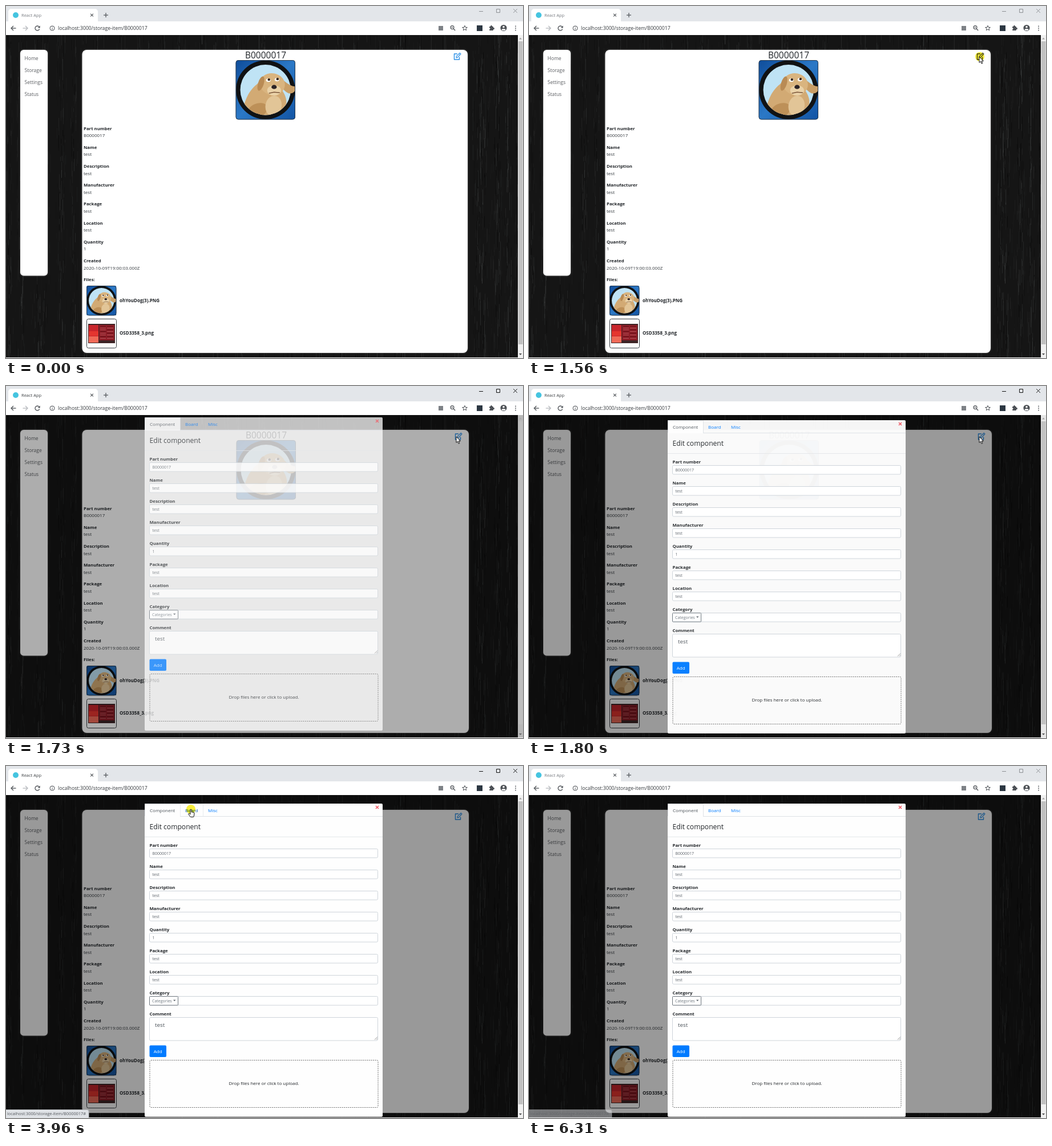
Recreate the animation shown at these times as an HTML page with a canvas. Size 906 px wide and 618 px high, loop 6400 ms.

```html
<!DOCTYPE html>
<html lang="en">
<head>
<meta charset="utf-8">
<title>Edit component</title>
<style>
html, body { margin: 0; width: 100%; height: 100%; overflow: hidden; background: #151515; }
canvas { display: block; }
</style>
</head>
<body>
<canvas id="stage" width="906" height="618"></canvas>
<script>
const W = 906, H = 618, LOOP = 6400, TOP = 51;
const INK = '#212529', LINK = '#007bff', LINE = '#dee2e6';
const FONT = '"Open Sans", "Noto Sans", sans-serif';
let c = document.getElementById('stage').getContext('2d');

// ---- helpers ----
function text(s, x, y, size, color = INK, weight = 400, align = 'left') {
  c.font = `${weight} ${size}px ${FONT}`;
  c.textAlign = align;
  c.fillStyle = color;
  c.fillText(s, x, y + size * 0.36);
}
function rect(x, y, w, h, color) {
  c.fillStyle = color;
  c.fillRect(x, y, w, h);
}
function box(x, y, w, h, r, fill, stroke, lw = 1) {
  c.beginPath();
  c.roundRect(x, y, w, h, r);
  if (fill) { c.fillStyle = fill; c.fill(); }
  if (stroke) { c.strokeStyle = stroke; c.lineWidth = lw; c.stroke(); }
}
function line(color, lw, ...pts) {
  c.strokeStyle = color;
  c.lineWidth = lw;
  c.beginPath();
  for (let i = 0; i < pts.length; i += 2) c.lineTo(pts[i], pts[i + 1]);
  c.stroke();
}
function poly(color, ...pts) {
  c.fillStyle = color;
  c.beginPath();
  for (let i = 0; i < pts.length; i += 2) c.lineTo(pts[i], pts[i + 1]);
  c.closePath();
  c.fill();
}
function oval(x, y, rx, ry, color, turn = 0) {
  c.fillStyle = color;
  c.beginPath();
  c.ellipse(x, y, rx, ry, turn, 0, 7);
  c.fill();
}
function ring(x, y, r, color, lw, from = 0, to = 2 * Math.PI) {
  c.strokeStyle = color;
  c.lineWidth = lw;
  c.beginPath();
  c.arc(x, y, r, from, to);
  c.stroke();
}
function cross(x, y, r, color, lw) {
  line(color, lw, x - r, y - r, x + r, y + r);
  line(color, lw, x - r, y + r, x + r, y - r);
}

// ---- wood background, painted once ----
const wood = document.createElement('canvas');
wood.width = W;
wood.height = H - TOP;
(function paintWood() {
  const g = wood.getContext('2d');
  let seed = 11;
  const rnd = () => (seed = (seed * 16807) % 2147483647) / 2147483647;
  g.fillStyle = '#151515';
  g.fillRect(0, 0, W, H);
  for (let i = 0; i < 9000; i++) {
    const x = Math.floor(rnd() * W);
    let v = 0.5 + 0.5 * Math.sin(x * 0.23 + 2 * Math.sin(x * 0.05));
    if (x > 815) v = Math.min(1, v + 0.25);
    if (rnd() > v) continue;
    const a = 0.02 + 0.13 * v * rnd();
    g.fillStyle = rnd() < 0.3 ? `rgba(0,0,0,${a * 3})` : `rgba(150,158,158,${a})`;
    g.fillRect(x, rnd() * H - 20, 1, 4 + rnd() * 38);
  }
})();

// ---- pictures ----
function dog(x, y, size) {
  c.save();
  c.translate(x, y);
  c.scale(size / 104, size / 104);
  c.beginPath();
  c.roundRect(0, 0, 104, 104, 5);
  c.clip();
  const sky = c.createLinearGradient(0, 0, 104, 104);
  sky.addColorStop(0, '#0f4d9b');
  sky.addColorStop(0.5, '#2b78c6');
  sky.addColorStop(1, '#1254a4');
  rect(0, 0, 104, 104, sky);
  oval(52, 52, 51.5, 51.5, '#101214');
  oval(52, 52, 44, 44, '#bfe3f5');
  c.save();
  c.beginPath();
  c.arc(52, 52, 44, 0, 7);
  c.clip();
  c.fillStyle = '#d2aa74';
  c.beginPath();
  c.moveTo(12, 92);
  c.bezierCurveTo(16, 64, 26, 50, 42, 38);
  c.bezierCurveTo(70, 30, 92, 60, 88, 78);
  c.lineTo(80, 104);
  c.lineTo(16, 104);
  c.fill();
  oval(38, 88, 18, 12, '#bd9058', -0.4);
  oval(66, 80, 14, 18, '#e2c597', 0.2);
  c.restore();
  c.fillStyle = '#c99e66';
  c.beginPath();
  c.moveTo(84, 36);
  c.quadraticCurveTo(96, 46, 104, 46);
  c.quadraticCurveTo(105, 60, 92, 58);
  c.quadraticCurveTo(84, 54, 80, 46);
  c.fill();
  oval(64, 42, 22, 19, '#d9b47f', 0.2);
  oval(44, 41, 5, 13, '#b98b55', 0.3);
  oval(67, 53, 12, 9, '#ead2a8');
  oval(57, 35, 4, 3, '#fff');
  oval(72, 34, 4, 3, '#fff');
  oval(58, 34, 2.2, 2.2, '#33251b');
  oval(73, 33, 2.2, 2.2, '#33251b');
  oval(67, 47, 4.6, 3.6, '#2c2326');
  line('#7b5639', 1.6, 58, 58, 67, 56, 77, 57);
  c.restore();
  box(x + .5, y + .5, size - 1, size - 1, 4, null, '#28384a');
}
function sheet() {
  box(141.5, 549.5, 52, 51, 3, '#fff', '#343a40');
  rect(144, 558, 47, 34, '#3d2426');
  rect(145, 560, 17, 31, '#c9252b');
  rect(145, 571, 17, 8, '#e5352f');
  rect(145, 580, 17, 11, '#f06a58');
  rect(163, 560, 27, 27, '#8c1c26');
  for (let i = 0; i < 8; i++) {
    rect(165, 562 + i * 3, 10, 1, i % 3 ? '#b4545a' : '#651119');
    rect(177, 562 + i * 3, 11, 1, i % 2 ? '#b4545a' : '#651119');
  }
}
function editIcon(x, color) {
  c.lineJoin = c.lineCap = 'round';
  line(color, 1.4, x + 6.5, 84, x + 1.5, 84, x + 1.5, 94, x + 10.5, 94, x + 10.5, 90);
  line(color, 1.2, x + 5, 90.8, x + 5.3, 88.4, x + 11.2, 82.4, x + 13, 84.2, x + 7.2, 90.3, x + 5, 90.8);
  line(color, 1, x + 9.6, 84.2, x + 11.4, 86);
  c.lineJoin = 'miter';
  c.lineCap = 'butt';
}

// ---- browser frame ----
function browser(active) {
  const ctl = active ? '#111' : '#8d9094', icon = '#4d5156';
  rect(0, 0, W, 27, '#e3e6ea');
  rect(0, 27, W, 24, '#fff');
  box(4, 5, 157, 24, [5, 5, 0, 0], '#fff');
  oval(17, 16, 5, 5, '#45c4e0');
  text('React App', 27, 16, 7.5, active ? '#3c4043' : '#777b80');
  cross(150.5, 16, 2.4, '#4d5156', 1.1);
  line('#4d5156', 1.2, 171, 16, 179, 16);
  line('#4d5156', 1.2, 175, 12, 175, 20);
  line(ctl, 1, 829, 9.5, 836, 9.5);
  box(859.5, 5.5, 6, 6, 0, null, ctl);
  cross(892.5, 8.5, 3.3, ctl, 1);

  line(icon, 1.3, 17.5, 39, 9.5, 39);
  line(icon, 1.3, 13, 35, 9, 39, 13, 43);
  line('#b4b7bb', 1.3, 29.5, 39, 37.5, 39);
  line('#b4b7bb', 1.3, 34, 35, 38, 39, 34, 43);
  ring(55, 39, 4, icon, 1.3, 0.4, 5.5);
  poly(icon, 59.6, 34.4, 59.6, 38.4, 55.6, 38.4);
  ring(81, 39, 4, icon, 1);
  rect(80.5, 38.4, 1, 3, icon);
  rect(80.5, 36.6, 1, 1, icon);
  text('localhost:3000/storage-item/B0000017', 91, 38.7, 8.7, '#33373b');

  rect(758, 35, 8, 8, '#7d8186');
  ring(782, 37.6, 3, icon, 1.1);
  line(icon, 1.3, 784.2, 40, 787.2, 43);
  line(icon, 1, 780.5, 37.6, 783.5, 37.6);
  c.strokeStyle = icon;
  c.lineWidth = 1;
  c.beginPath();
  for (let i = 0; i < 10; i++) {
    const a = i * Math.PI / 5 - Math.PI / 2, r = i % 2 ? 2 : 4.6;
    c.lineTo(804 + r * Math.cos(a), 39 + r * Math.sin(a));
  }
  c.closePath();
  c.stroke();
  rect(825, 34, 10, 10, '#2c3742');
  box(847, 36, 7, 7, 1, icon);
  oval(850.5, 35.6, 1.6, 1.6, icon);
  oval(854.4, 39.5, 1.6, 1.6, icon);
  oval(847.2, 39.7, 1.2, 1.2, '#fff');
  oval(872, 38.5, 5.6, 5.6, icon);
  oval(872, 36.8, 1.8, 1.8, '#fff');
  oval(872, 41.6, 3.4, 1.5, '#fff');
  for (const y of [35.5, 39, 42.5]) oval(893, y, .9, .9, icon);
}
function scrollbar() {
  rect(897, TOP, 9, 566, '#f1f1f1');
  rect(898, 62, 7.5, 532, '#c1c1c1');
  poly('#a3a3a3', 899, 58.5, 904, 58.5, 901.5, 55.5);
  poly('#505050', 899, 610, 904, 610, 901.5, 613);
}

// ---- item page ----
const ITEM = [
  ['Part number', 'B0000017'], ['Name', 'test'], ['Description', 'test'],
  ['Manufacturer', 'test'], ['Package', 'test'], ['Location', 'test'],
  ['Quantity', '1'], ['Created', '2020-10-09T19:00:03.000Z'], ['Files:', '']
];
function page(open, hover) {
  const grow = open ? 2 : 0;
  c.drawImage(wood, 0, TOP);
  c.shadowColor = 'rgba(255,255,255,.35)';
  c.shadowBlur = 3;
  box(25, 77, 48, 396.5, 6, '#fff');
  box(133.5, 77, 675.5 + grow, 532, 8, '#fff');
  c.shadowBlur = 0;
  ['Home', 'Storage', 'Settings', 'Status'].forEach((s, i) =>
    text(s, 32.5, 92 + i * 21, 8.5, '#5c5f63'));
  text('B0000017', 455 + grow / 2, 86, 15.5, INK, 500, 'center');
  dog(402.5 + grow / 2, 95, 104.5);
  ITEM.forEach(([label, value], i) => {
    const y = 214.7 + i * 33.2;
    text(label, 136, y, 7.8, INK, 700);
    text(value, 136, y + 12.6, 8, '#33383d');
  });
  dog(141, 491, 52.5);
  sheet();
  text('ohYouDog(3).PNG', 199, 517, 8, INK, 700);
  text('OSD3358_3.png', 199, 574.5, 8, INK, 700);
  editIcon(784 + grow, hover ? '#3a3d3f' : '#2a8fe6');
}

// ---- edit dialog ----
const TABS = [['Component', 243, 305], ['Board', 305, 345], ['Misc', 345, 380]];
const FIELDS = ['Part number', 'Name', 'Description', 'Manufacturer', 'Quantity',
  'Package', 'Location', 'Category', 'Comment'];
function dialog(tab, hover) {
  box(243, 66, 417, 550, 2, '#fefefe');
  line(LINE, 1, 243, 88.5, 660, 88.5);
  TABS.forEach(([name, x0, x1], i) => {
    const on = i === tab;
    if (on) rect(x0, 67, x1 - x0, 22, '#fefefe');
    if (on || i === hover) {
      line(on ? LINE : '#e9ecef', 1, x0 + .5, 88, x0 + .5, 66.5, x1 + .5, 66.5, x1 + .5, 88);
    }
    text(name, x0 + 9, 78, 8, on ? '#495057' : i === hover ? '#0056b3' : LINK);
  });
  cross(650.5, 72.5, 2.5, '#f0606a', 1.7);
  text('Edit ' + TABS[tab][0].toLowerCase(), 251.5, 107, 12.1, INK, 500);
  line('#e4e7ea', 1, 243, 124.5, 660, 124.5);

  FIELDS.forEach((name, i) => {
    const y = 139.6 + i * 36.97;
    text(name, 251.5, y, 7.8, INK, 700);
    if (name === 'Comment') return;
    box(251.5, Math.round(y + 5.6) + .5, 400, 15.5, 2, '#fff', '#ced4da');
    const value = i === 0 ? 'B0000017' : name === 'Quantity' ? '1' : 'test';
    if (name !== 'Category') text(value, 256.5, y + 14, 7, '#5a6168');
  });
  box(251.5, 404.5, 50, 15.5, 1, '#fff', '#6c757d');
  text('Categories', 256, 412, 7, '#6c757d');
  poly('#5a6168', 293, 410.5, 297.5, 410.5, 295.2, 413);
  box(251.5, 441.5, 400, 40.5, 2, '#fff', '#ced4da');
  text('test', 261, 454.5, 9.8, '#495057');
  line('#777', .8, 646, 480.5, 651, 475.5);
  line('#777', .8, 649, 480.5, 651, 478.5);
  box(251.5, 490.5, 29.5, 20.5, 2, LINK);
  text('Add', 266.2, 501, 8, '#fff', 400, 'center');
  c.setLineDash([2.2, 1.4]);
  box(252, 516.5, 400, 83, 2, null, '#666', .9);
  c.setLineDash([]);
  text('Drop files here or click to upload.', 452, 557, 8, INK, 400, 'center');
}

// ---- pointer ----
// start, end, steps, control x/y, end x/y
const MOVES = [
  [100, 340, 4, 815, 520, 762, 373],
  [510, 1060, 8, 835, 220, 779, 91],
  [1220, 1390, 3, 783, 87, 789, 89],
  [2170, 2560, 6, 620, 240, 490, 349],
  [2900, 3380, 7, 430, 385, 325, 78],
  [3540, 3700, 3, 324, 78, 323, 76],
  [4120, 4370, 4, 342, 76, 361, 76],
  [4660, 4890, 4, 320, 74, 282, 75],
  [5140, 5300, 3, 292, 95, 317, 133],
  [5370, 6000, 9, 520, 300, 822, 621]
];
const CLICKS = [1560, 3960, 4450, 5000];
function pointerAt(t) {
  let x = 836, y = 591;
  for (const [t0, t1, n, cx, cy, ex, ey] of MOVES) {
    if (t < t0) break;
    const k = Math.min(n, 1 + Math.floor((t - t0) / (t1 - t0) * (n - 1) + 1e-6)) / n;
    const u = k * k * (3 - 2 * k), v = 1 - u;
    x = v * v * x + 2 * u * v * cx + u * u * ex;
    y = v * v * y + 2 * u * v * cy + u * u * ey;
  }
  return { x, y, shown: t >= 100 && t < 6000 };
}
const arrow = new Path2D('M0 0V10.4L2.4 8.2L4.1 12.2L5.8 11.5L4.2 7.6H7.4Z');
const hand = new Path2D('M0 .6Q1 -.6 2 .6V5L3.6 4.9L5.2 5.4L6.8 6V10L5.6 13.5H.4L-3.4 8.6Q-3.4 7 -1.8 7.6L0 9Z');
function pointer({ x, y }, overTab, clicking) {
  if (clicking) {
    c.globalCompositeOperation = 'multiply';
    oval(x + 1, y, 8, 8, '#f8ee3c');
    c.globalCompositeOperation = 'source-over';
  }
  c.save();
  c.translate(x, y);
  const shape = overTab ? hand : arrow;
  c.fillStyle = '#fff';
  c.strokeStyle = '#111';
  c.lineWidth = 1;
  c.fill(shape);
  c.stroke(shape);
  c.restore();
}

// value of the last [time, value] pair reached
const held = (t, pairs) => pairs.reduce((v, [at, next]) => t >= at ? next : v, 0);

function statusBar(alpha) {
  c.globalAlpha = alpha;
  box(-1, 603.5, 146, 16, [0, 3, 0, 0], '#dfe2e6', '#b5b8bc');
  text('localhost:3000/storage-item/B0000017#', 2, 610.5, 7.4, '#50545a');
  c.globalAlpha = 1;
}

function draw(t) {
  const active = t >= 1630 && t < 6310, open = t >= 1630;
  const fade = held(t, [[1630, .27], [1730, .75], [1800, .96], [1880, 1]]);
  const lift = held(t, [[1630, -20], [1730, -11], [1800, -6], [1880, -2], [1960, 0]]);
  const tab = held(t, [[4040, 1], [4520, 2], [5070, 0]]);
  const p = pointerAt(t);
  const overTab = t > 2900 && p.shown && p.y >= 66 && p.y < 89
    ? TABS.findIndex(([, x0, x1]) => p.x >= x0 && p.x < x1) : -1;

  page(open, t >= 980 && t < 1630);
  if (open) {
    rect(0, TOP, W, 566, `rgba(0,0,0,${held(t, [[1630, .14], [1730, .32], [1800, .4]])})`);
    c.save();
    c.beginPath();
    c.rect(0, TOP, W, 566);
    c.clip();
    c.globalAlpha = fade;
    scrollbar();
    c.translate(0, lift);
    dialog(tab, overTab);
    c.restore();
  } else {
    scrollbar();
  }
  rect(0, 617, W, 1, '#f4f4f4');
  browser(active);
  const bar = held(t, [[3540, .35], [3620, .7], [3700, 1], [6310, .5]]);
  if (bar) statusBar(bar);
  if (p.shown) pointer(p, overTab >= 0, CLICKS.some(at => t >= at && t < at + 70));
}

function tick() {
  draw(performance.now() % LOOP);
  requestAnimationFrame(tick);
}
tick();
</script>
</body>
</html>
```
